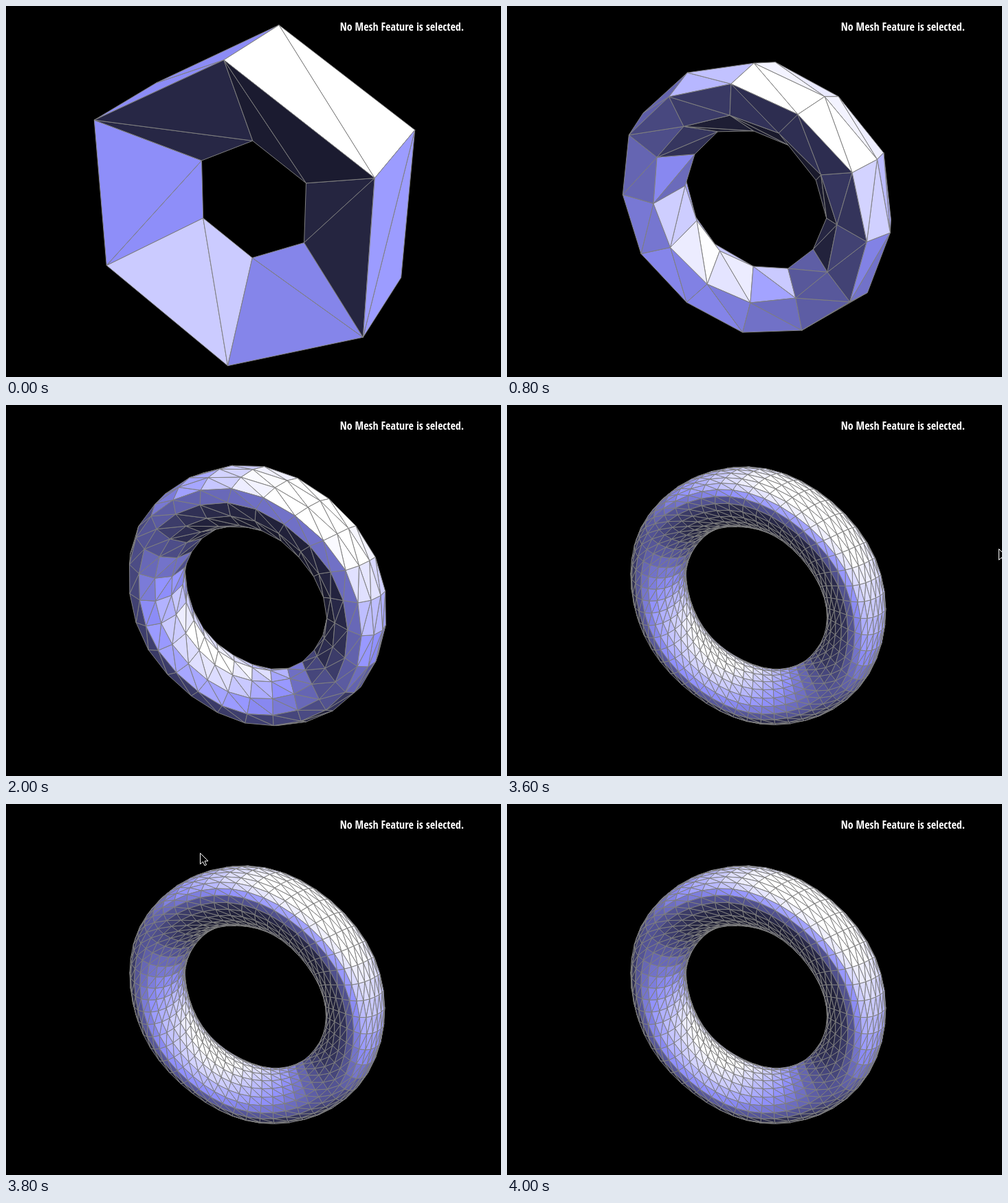
An HTML page with a canvas that plays this animation: 720 by 540 pixels, repeating every 4500 ms.

```html
<!DOCTYPE html>
<html lang="en">
<head>
<meta charset="utf-8">
<title>Subdivided torus</title>
<style>
  html, body { margin: 0; overflow: hidden; background: #000; }
  canvas { display: block; }
  #status {
    position: absolute; top: 19px; left: 0; width: 666px;
    text-align: right; white-space: nowrap; color: #fff;
    font: bold 16px/22px "Open Sans Condensed", "Open Sans", sans-serif;
    font-stretch: 75%; font-variation-settings: "wdth" 75;
  }
  #cursor { position: absolute; left: 0; top: 0; }
</style>
</head>
<body>
<canvas id="stage" width="720" height="540"></canvas>
<div id="status">No Mesh Feature is selected.</div>
<canvas id="cursor" width="720" height="540"></canvas>
<script>
const context = id => document.getElementById(id).getContext('2d');
const scene = context('stage'), overlay = context('cursor');
const LOOP = 4500;
const STAGE_STARTS = [800, 2000, 3000];
const { PI, sin, cos, sqrt, hypot } = Math;

// Camera: torus axes in view space (x right, y down, z away).
const AXES = [[-.776, -.622, .103], [.451, -.664, -.597], [.44, -.419, .795]];
const CENTER = [358.5, 284.3], FOCAL = 1316, DISTANCE = 6.85;

const makeGrid = (w, h, point) =>
  Array.from({ length: w }, (_, i) => Array.from({ length: h }, (_, j) => point(i, j)));

const at = (grid, i, j) => {
  const w = grid.length, h = grid[0].length;
  return grid[(i + w) % w][(j + h) % h];
};

// Six segments around, triangular cross-section.
const coarse = makeGrid(6, 3, (i, j) => {
  const u = i * PI / 3, v = PI / 3 - j * 2 * PI / 3, r = 1 + cos(v) / 2;
  return [r * cos(u), r * sin(u), sin(v) / 2];
});

// Loop subdivision of a regular grid: spread, then smooth along the three edge directions.
function subdivide(grid) {
  let fine = makeGrid(grid.length * 2, grid[0].length * 2, (i, j) =>
    i % 2 || j % 2 ? [0, 0, 0] : grid[i / 2][j / 2].map(c => 4 * c));
  for (const [di, dj] of [[1, 0], [0, 1], [1, 1]]) {
    const old = fine;
    fine = makeGrid(old.length, old[0].length, (i, j) => {
      const a = at(old, i - di, j - dj), b = at(old, i + di, j + dj);
      return old[i][j].map((c, k) => (a[k] + 2 * c + b[k]) / 4);
    });
  }
  return fine;
}

function project(p) {
  const [x, y, z] = [0, 1, 2].map(k => p.reduce((sum, c, a) => sum + c * AXES[a][k], 0));
  const depth = DISTANCE + z;
  return [CENTER[0] + FOCAL * x / depth, CENTER[1] + FOCAL * y / depth, depth];
}

function shade(a, b, c) {
  const [ux, uy, uz] = b.map((q, k) => q - a[k]);
  const [vx, vy, vz] = c.map((q, k) => q - a[k]);
  const nx = uy * vz - uz * vy, ny = uz * vx - ux * vz, nz = ux * vy - uy * vx;
  const light = (10 * nx - 245 * ny + 52 * nz) / hypot(nx, ny, nz);
  const level = 19 + (light + sqrt(light * light + 3300)) / 2;
  return `rgb(${level}, ${level}, ${level * 1.76})`;
}

// Visible triangles, farthest first.
function buildFaces(grid) {
  const faces = [];
  const add = (...corners) => {
    const [a, b, c] = corners.map(project);
    if ((b[0] - a[0]) * (c[1] - a[1]) <= (b[1] - a[1]) * (c[0] - a[0])) return;
    faces.push({ points: [a, b, c], depth: a[2] + b[2] + c[2], color: shade(...corners) });
  };
  grid.forEach((column, i) => column.forEach((p, j) => {
    const opposite = at(grid, i + 1, j + 1);
    add(p, at(grid, i + 1, j), opposite);
    add(p, opposite, at(grid, i, j + 1));
  }));
  return faces.sort((f, g) => g.depth - f.depth);
}

const meshes = [];
for (let grid = coarse; meshes.length < 4; grid = subdivide(grid)) meshes.push(buildFaces(grid));

function polygon(ctx, points, fill, stroke) {
  ctx.fillStyle = fill;
  ctx.strokeStyle = stroke;
  ctx.lineJoin = 'bevel';
  ctx.beginPath();
  for (const [x, y] of points) ctx.lineTo(x, y);
  ctx.closePath();
  ctx.fill();
  ctx.stroke();
}

function drawMesh(stage) {
  scene.clearRect(0, 0, 720, 540);
  for (const { points, color } of meshes[stage]) polygon(scene, points, color, '#808080');
}

function drawCursor(step) {
  overlay.clearRect(0, 0, 720, 540);
  if (step < 0 || step > 3) return;
  const x = 715.5 - 216.5 * step, y = 209.5 - 69 * step;
  const arrow = [[0, 0], [0, 16], [4, 12.5], [6.5, 18], [9, 17], [6.5, 11.5], [11.5, 11.5]];
  polygon(overlay, arrow.map(([dx, dy]) => [x + dx, y + dy]), '#000', '#fff');
}

let shownStage, shownStep;
function frame(now) {
  const t = now % LOOP;
  const stage = STAGE_STARTS.filter(start => t >= start).length;
  const step = Math.floor((t - 3600) / 100);
  if (stage !== shownStage) drawMesh(shownStage = stage);
  if (step !== shownStep) drawCursor(shownStep = step);
  requestAnimationFrame(frame);
}
frame(performance.now());
</script>
</body>
</html>
```
